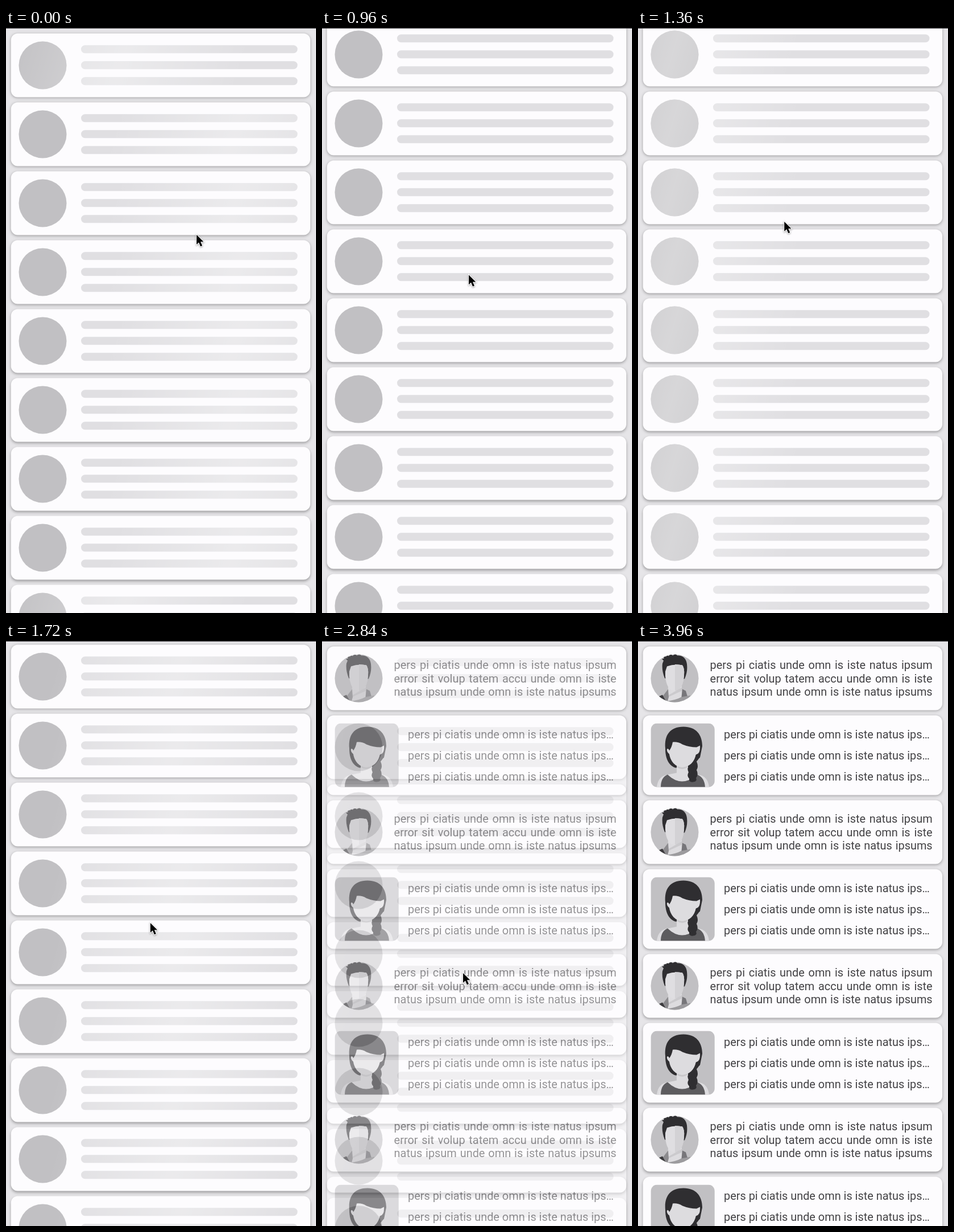
Recreate the animation shown at these times as an HTML page with a canvas. Size 545 by 1027 pixels, loop 4.68 s.

```html
<!DOCTYPE html>
<html>
<head>
<meta charset="utf-8">
<style>
  html, body { margin: 0; width: 100%; height: 100%; overflow: hidden; background: #e6e5e8; }
  canvas { display: block; width: 545px; height: 1027px; }
</style>
</head>
<body>
<canvas id="stage" width="545" height="1027"></canvas>
<script>
const W = 545, H = 1027, LOOP = 4680, STEP = 40;
const ctx = document.getElementById('stage').getContext('2d');

// Pointer stops: time, x, y
const STOPS = [
  [0, 335, 363], [160, 185, 220], [340, 185, 220], [800, 258, 526], [1160, 258, 304],
  [2040, 252, 577], [2560, 248, 583], [3400, 248, 583], [3760, 284, 571], [3960, 290, 564]
];

const ramp = (t, from, to) => Math.min(1, Math.max(0, (t - from) / (to - from)));
const ease = p => p * p * (3 - 2 * p);

function pointerAt(t) {
  const i = STOPS.findIndex(stop => stop[0] > t);
  const [t0, x0, y0] = STOPS[i - 1], [t1, x1, y1] = STOPS[i];
  const p = ease(ramp(t, t0, t1));
  return [x0 + (x1 - x0) * p, y0 + (y1 - y0) * p];
}

// A short drag scrolls the list up, a later one brings it back.
const scrollAt = t => 19 * (ramp(t, 840, 920) - ramp(t, 1640, 1735));

// Centre of the light band sweeping over a row; the outer rows trail behind.
function bandAt(row, t) {
  let lag = row % 8 ? 0 : 200 * (1 - ramp(t, 340, 800));
  if (row === 0) lag += 445 * ramp(t, 1720, 2560);
  const run = Math.max(0, Math.min(t, 2560) - 340) * .667;
  return (402 + run - lag + 300) % 1022 - 300;
}

function shape(c, color, d) {
  c.fillStyle = color;
  c.fill(new Path2D(d));
}

function backdrop(c) {
  c.fillStyle = '#e6e5e8';
  c.fillRect(0, 0, W, H);
}

function topLine(c) {
  c.fillStyle = '#3d3c3f';
  c.fillRect(0, 0, W, 1);
}

function card(c, y, h) {
  c.save();
  c.shadowColor = 'rgba(0,0,0,.32)';
  c.shadowBlur = 5;
  c.shadowOffsetY = 1 + 2 * Math.max(0, y) / H;
  c.fillStyle = '#fdfcfe';
  c.beginPath();
  c.roundRect(8.7, y, 526.3, h, 12);
  c.fill();
  c.restore();
}

function skeleton(t) {
  backdrop(ctx);
  for (let i = 0; i < 9; i++) {
    const y = 9.5 + i * 121 - scrollAt(t), mid = y + 56, x = bandAt(i, t);
    const shine = ctx.createLinearGradient(x - 200, mid - 60, x + 200, mid + 60);
    shine.addColorStop(0, 'rgba(255,255,255,0)');
    shine.addColorStop(.5, 'rgba(255,255,255,.36)');
    shine.addColorStop(1, 'rgba(255,255,255,0)');
    const paint = color => {
      for (const style of [color, shine]) {
        ctx.fillStyle = style;
        ctx.fill();
      }
    };
    card(ctx, y, 112);
    ctx.beginPath();
    ctx.arc(64.5, mid, 42, 0, 2 * Math.PI);
    paint('#c1c0c3');
    ctx.beginPath();
    for (let k = 0; k < 3; k++) ctx.roundRect(132, y + 20.7 + 28 * k, 380.5, 14, 7);
    paint('#e0dfe2');
  }
  topLine(ctx);
}

// Avatars are drawn relative to the top of their card.
function roundAvatar(c) {
  c.beginPath();
  c.arc(64.5, 56, 42, 0, 2 * Math.PI);
  c.clip();
  c.fillStyle = '#c1c0c3';
  c.fillRect(20, 10, 90, 90);
  shape(c, '#dddcdf', 'M53 70H77V100H44L52 88Z');
  shape(c, '#2f2e31', 'M47 56C43 46 42 37 43 30L45 25L42 22L46 21L44 17L50 18L49 14L54 17L57 13L61 16L66 13L69 16C78 15 85 21 86 31C87 41 86 47 82 57Z');
  shape(c, '#dfdee1', 'M48 44L51 35Q64 30 78 33Q82 38 81 50C80 66 75 78 65 78C54 78 49 66 48 52Z');
  shape(c, '#d3d2d5', 'M65 31.5Q72 31.5 78 33Q82 38 81 50C80 66 75 78 65 78Z');
  shape(c, '#cbcacd', 'M77 72V78L53 89V86Z');
  shape(c, '#8b8a8d', 'M53 75L43 88L40 100H51L54 89Z');
  shape(c, '#77767a', 'M78 75L84 78L87 88L76 93Z');
  shape(c, '#9c9b9e', 'M49 96Q65 95 76 89L92 86L95 100H49Z');
  shape(c, '#3b3a3d', 'M36 88L43 85L49 96V100H36Z');
}

function squareAvatar(c) {
  c.beginPath();
  c.roundRect(22.7, 14, 112, 112, 11);
  c.clip();
  c.fillStyle = '#c1c0c3';
  c.fillRect(22, 14, 113, 113);
  shape(c, '#2f2e31', 'M48 58C46 35 56 20 80 20C102 20 113 34 113 54L109 74L88 92H66C53 88 48 74 48 58Z');
  shape(c, '#dddcdf', 'M33 126Q35 109 48 105L68 101V80H88V101L110 105Q123 109 125 126Z');
  shape(c, '#c9c8cb', 'M68 86Q78 96 88 86V90Q78 98 68 91Z');
  shape(c, '#5d5c5f', 'M40 126Q40 109 52 104Q77 128 104 104Q117 109 118 126Z');
  shape(c, '#dddcdf', 'M55 62C58 58 60 53 61 47Q70 46 78 51Q90 56 103 56L109 53Q110 67 102 69C99 82 90 91 78 91C66 91 57 81 55 68Q50 64 51 59Q54 58 55 62Z');
  shape(c, '#2f2e31', 'M102 69L110 66Q109 75 103 81Q107 90 103 96Q107 104 102 110Q105 116 97 117Q89 118 90 111Q85 106 89 100Q85 92 91 88Q99 82 102 69Z');
}

const PARAGRAPH = [
  'pers pi ciatis unde omn is iste natus ipsum',
  'error sit volup tatem accu unde omn is iste',
  'natus ipsum unde omn is iste natus ipsums'
];

function justified(c, line, x, y, width) {
  const words = line.split(' ').map(s => [s, c.measureText(s).width]);
  const gap = (width - words.reduce((sum, w) => sum + w[1], 0)) / (words.length - 1);
  for (const [s, w] of words) {
    c.fillText(s, x, y);
    x += w + gap;
  }
}

function makeContent() {
  const canvas = document.createElement('canvas');
  canvas.width = W;
  canvas.height = H;
  const c = canvas.getContext('2d');
  backdrop(c);
  c.font = '19.9px Roboto, sans-serif';
  let y = 9.5;
  for (let i = 0; i < 8; i++) {
    const square = i % 2, h = square ? 140 : 112;
    card(c, y, h);
    c.save();
    c.translate(0, y);
    c.save();
    (square ? squareAvatar : roundAvatar)(c);
    c.restore();
    c.fillStyle = '#434245';
    PARAGRAPH.forEach((line, k) => {
      if (square) c.fillText('pers pi ciatis unde omn is iste natus ips…', 151, 40.3 + 37.2 * k);
      else justified(c, line, 126.6, 39.8 + 23.2 * k, 391);
    });
    c.restore();
    y += h + 9;
  }
  topLine(c);
  return canvas;
}

function pointer(x, y) {
  const arrow = new Path2D('M0 0V17L4 13.4L7 20.4L10 19.1L7 12.3H12.3Z');
  ctx.save();
  ctx.translate(x, y);
  ctx.lineWidth = 2;
  ctx.strokeStyle = '#fff';
  ctx.shadowColor = 'rgba(0,0,0,.4)';
  ctx.shadowBlur = 3;
  ctx.shadowOffsetY = 1;
  ctx.stroke(arrow);
  ctx.shadowColor = 'transparent';
  ctx.fillStyle = '#000';
  ctx.fill(arrow);
  ctx.restore();
}

const content = makeContent();

function draw(now) {
  const t = Math.floor(now % LOOP / STEP) * STEP;
  const fade = ramp(t, 2640, 3000);
  if (fade < 1) skeleton(t);
  ctx.globalAlpha = fade;
  ctx.drawImage(content, 0, 0);
  ctx.globalAlpha = 1;
  if (t < 3960) pointer(...pointerAt(t));
}

let start;
function tick(now) {
  start ??= now;
  draw(now - start);
  requestAnimationFrame(tick);
}
draw(0);
requestAnimationFrame(tick);
</script>
</body>
</html>
```
